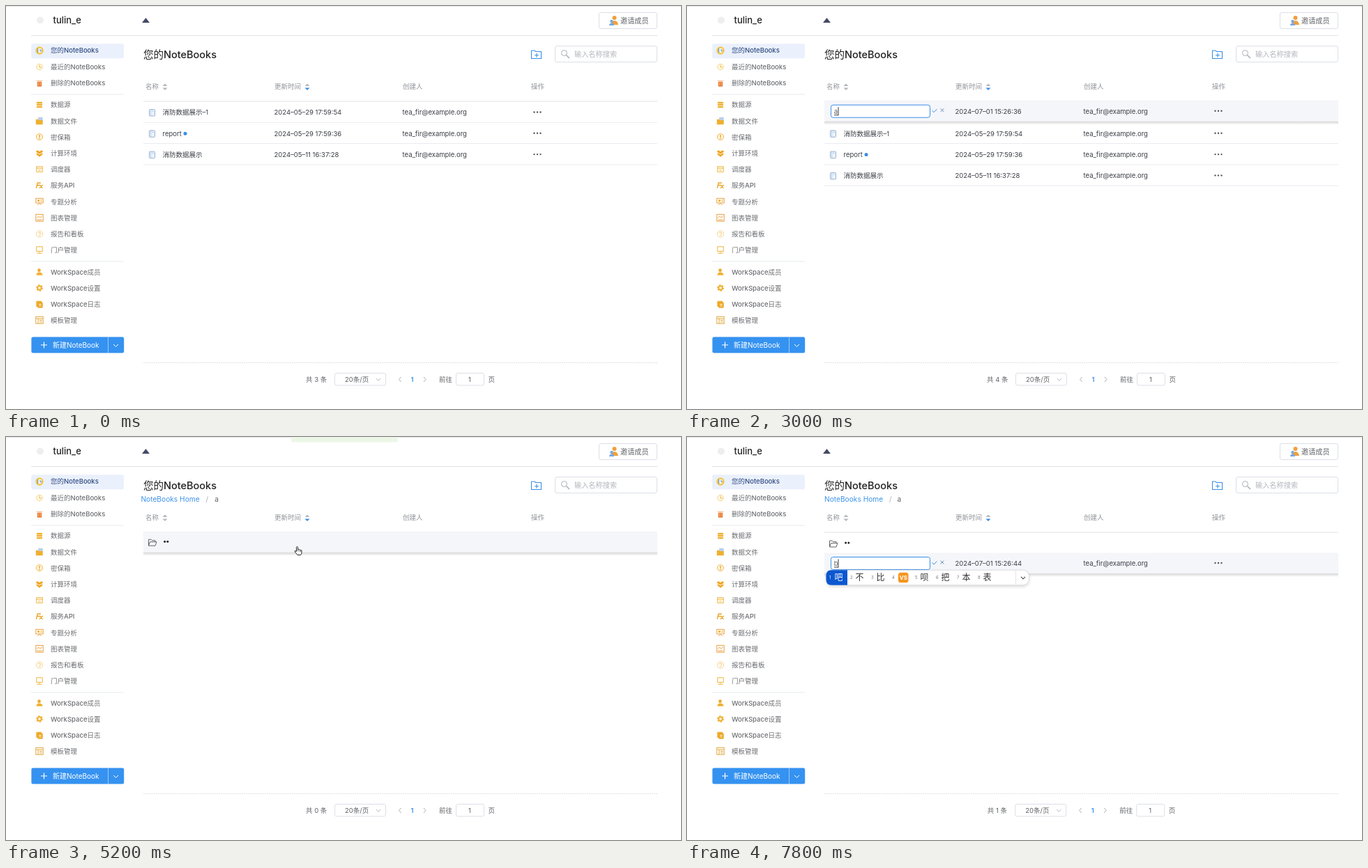
Animation of 968 by 579 pixels, one loop 8 s. Source, as an HTML page:

```html
<!DOCTYPE html>
<html lang="zh-CN">
<head>
<meta charset="utf-8">
<style>
html, body { margin: 0; width: 100%; height: 100%; overflow: hidden; background: #fff; }
svg { display: block; width: 968px; height: 579px; font: 9.5px Inter, "Noto Sans CJK SC", "Noto Sans CJK", sans-serif; }
.shade { filter: drop-shadow(0 2px 2px rgba(0, 0, 0, .15)); }
</style>
</head>
<body>
<svg viewBox="0 0 968 579">
<defs><linearGradient id="fall" x2="0" y2="1"><stop stop-opacity=".16"/><stop offset="1" stop-opacity="0"/></linearGradient></defs>
<g id="base"></g><g id="live"></g>
</svg>
<script>
const LOOP = 8000, PITCH = 30.3;
const BLUE = '#3a8ee6', GREY = '#606266', DARK = '#3b3e45', PALE = '#dcdfe6', GOLD = '#efb02e', ORANGE = '#e99a35';

// y is the vertical centre of the text
const text = (x, y, str, fill = GREY, size = 9.5, more = '') =>
  `<text x="${x}" y="${y + size * .36}" fill="${fill}" font-size="${size}" ${more}>${str}</text>`;
const rect = (x, y, w, h, fill, more = '') =>
  `<rect x="${x}" y="${y}" width="${w}" height="${h}" fill="${fill}" ${more}/>`;
const path = (d, stroke, width = 1, fill = 'none', more = '') =>
  `<path d="${d}" stroke="${stroke}" stroke-width="${width}" fill="${fill}" ${more}/>`;
const dot = (x, y, r, fill, more = '') => `<circle cx="${x}" cy="${y}" r="${r}" fill="${fill}" ${more}/>`;
const at = (x, y, body, scale = 1) => `<g transform="translate(${x} ${y}) scale(${scale})">${body}</g>`;
const box = (x, y, w, h, stroke = PALE) => rect(x + .5, y + .5, w - 1, h - 1, '#fff', `rx="2.5" stroke="${stroke}"`);
const line = (y, x1, x2, color) => path(`M${x1} ${y}H${x2}`, color);

const outline = (x, y, w, h, color) => rect(x, y, w, h, 'none', `stroke="${color}"`);
const menu = [
  [64, '您的NoteBooks', dot(0, 0, 6, '#f3c53f') + rect(-2.5, -3.5, 5.5, 7, '#f5f8ff', 'rx="1"') + path('M-2.5 -3.5V3.5M0 -1H2V2', '#5a86d0')],
  [88, '最近的NoteBooks', dot(0, -.5, 4.5, '#fffaea', 'stroke="#f4cf77"') + path('M0 -3.5V0H3', GOLD)],
  [111, '删除的NoteBooks', rect(-3.5, -2.5, 7, 7.5, '#e9823c', 'rx="1"') + path('M-4.5 -3.8H4.5M-1.5 -1V3M1.5 -1V3', '#f5b07c')],
  [142, '数据源', [-3.2, 0, 3.2].map(y => rect(-4.5, y - 1.2, 9, 2.6, GOLD, 'rx="1.3"')).join('')],
  [165.5, '数据文件', rect(-2, -6, 7, 7, '#b9d0ea', 'rx="1"') + path('M-5.5 -3H-2L-1 -1.5H5V5H-5.5Z', 'none', 0, GOLD)],
  [188.5, '密保箱', dot(0, -.5, 4.7, '#fff8e4', `stroke="${GOLD}"`) + dot(0, -2, 1.2, ORANGE) + path('M0 -1V3', ORANGE)],
  [212, '计算环境', path('M-5.5 -3.5L-3 -5 0 -3 3 -5 5.5 -3.5 3.5 -1 5 1 0 5 -5 1 -3.5 -1Z', 'none', 0, '#f0a51f') + path('M-3.5 -1L0 1 3.5 -1', '#fff')],
  [235, '调度器', outline(-4.5, -4.5, 9, 8, GOLD) + path('M-4.5 -2H4.5M-2 1H2', GOLD)],
  [258, '服务API', path('M-5 4L-3 -4H2M-4 -.5H1M0 4L5 -1M1 -1L4.5 4', '#eaa21f', 1.4)],
  [281.5, '专题分析', outline(-5.5, -5.5, 11, 7, ORANGE) + path('M-3 4.5L0 2 3 4.5', ORANGE) + dot(-1.5, -2, 1.8, GOLD) + path('M1.5 -3H4M1.5 -1H4', GOLD)],
  [304.5, '图表管理', outline(-5.5, -5.5, 11, 10.5, ORANGE) + path('M-4 0L-1.5 -2.5 1 -.5 4 -3M-4 3H4', ORANGE)],
  [328, '报告和看板', dot(0, -.5, 5, '#fffaf0', 'stroke="#f5d79b"') + path('M-2 -2Q0 -4 2 -2Q2 0 0 1V2.5', '#f2cc82')],
  [351, '门户管理', outline(-4.5, -5.5, 9, 7, GOLD) + path('M0 2V4M-4 4.5H4', GOLD)],
  [382.5, 'WorkSpace成员', dot(-.5, -3, 2.5, '#edab29') + path('M-5 4.5Q-4 0 -.5 0Q4 0 5 4.5Z', 'none', 0, GOLD)],
  [405.5, 'WorkSpace设置', dot(0, -.5, 3, 'none', `stroke="${GOLD}" stroke-width="2.2"`) + dot(0, -.5, 4.5, 'none', `stroke="${GOLD}" stroke-width="1.5" stroke-dasharray="2.2 2.5"`)],
  [429, 'WorkSpace日志', rect(-5, -5.5, 8.5, 9, '#f0b12d', 'rx="1.5"') + rect(-3, -3.5, 8, 8.5, '#eda421', 'rx="1.5"') + path('M-1 -.5H3M-1 2H3', '#fff')],
  [452, '模板管理', outline(-5.5, -6, 11, 10.5, '#dfa02f') + path('M-5 -3H5M-2 -3V4M0 -.5H4M0 2H4', '#dfa02f')]
];

const sorter = (x, down) =>
  path(`M${x - 3.5} 115L${x} 111.5 ${x + 3.5} 115Z`, 'none', 0, '#b4b8c0') +
  path(`M${x - 3.5} 117.5L${x} 121 ${x + 3.5} 117.5Z`, 'none', 0, down);

const base =
  line(.5, 0, 968, '#e6e6e6') + line(42.5, 36, 934, '#e3e3e3') +
  dot(49, 20.5, 5, '#eeeeee') +
  text(67.5, 20.5, 'tulin_e', '#222', 13, 'font-weight="500"') +
  path('M195 24L200.5 17 206 24Z', 'none', 0, '#454b66') +
  box(850, 9, 84, 24) +
  dot(872.5, 17, 3, '#f0a03c') + path('M867.5 27Q868 21 872.5 21T878 27Z', 'none', 0, '#f0a03c') +
  dot(868.5, 22, 2.2, '#77a9e4') + path('M865 28Q865 24.5 868.5 24.5T872 28Z', 'none', 0, '#77a9e4') +
  text(881, 21, '邀请成员', GREY, 10.2) +
  rect(36.3, 54.3, 132.6, 21, '#eaf0fc', 'rx="2"') +
  menu.map(([y, label, icon], i) => at(48, y, icon, .94) +
    text(64, y, label, i ? '#6c6e72' : '#2f4a80', 9.5, 'font-weight="500"')).join('') +
  line(127, 36, 169, '#e8eaee') + line(367, 36, 169, '#e8eaee') +
  rect(36.4, 475.4, 132.8, 23.2, '#3592f0', 'rx="2.5"') + path('M146.5 475.4V498.6', '#9ccaf8') +
  path('M50 487H59M54.5 482.5V491.5', '#fff', 1.2) + text(67, 487, '新建NoteBook', '#fff', 10) +
  path('M154 486L157.5 489.5 161 486', '#fff') +
  text(197, 69.5, '您的NoteBooks', '#222', 14.5, 'font-weight="500"') +
  box(787, 57, 147, 24) + dot(800.5, 67.5, 4, 'none', 'stroke="#a9adb5"') + path('M803.5 70.5L808 75', '#a9adb5', 1.5) +
  text(815, 69.5, '输入名称搜索', '#b3b6bd', 10.2) +
  text(200, 116, '名称', '#8f9298') + sorter(228, '#b4b8c0') +
  text(385, 116, '更新时间', '#8f9298') + sorter(432, BLUE) +
  text(569, 116, '创建人', '#8f9298') + text(753, 116, '操作', '#8f9298') +
  line(137, 197, 934, '#dfe1e6') +
  path('M197 512.5H934', '#dfe1e6', 1, 'none', 'stroke-dasharray="2 1"');

const files = [
  { name: '消防数据展示–1', time: '2024–05–29 17:59:54' },
  { name: 'report', time: '2024–05–29 17:59:36', unread: true },
  { name: '消防数据展示', time: '2024–05–11 16:37:28' }
];
const newA = { name: 'a', time: '2024–07–01 15:26:36' };
const newB = { name: 'b', time: '2024–07–01 15:26:44' };
const up = { up: true };

const track = [
  [350, 640, 340], [700, 735, 135], [950, 759, 72], [1400, 759, 72], [1650, 640, 112],
  [2150, 340, 152], [2650, 333, 151], [3950, 333, 151], [4500, 419, 163], [5650, 419, 163],
  [5800, 740, 148], [5900, 759, 72], [6080, 759, 72], [6150, 640, 112], [6250, 365, 199],
  [6300, 365, 199], [6500, 338, 182], [7050, 333, 181]
];

const clamp = v => Math.min(1, Math.max(0, v));
const ramp = (t, start, length) => clamp((t - start) / length);
const within = (t, a, b) => t >= a && t < b;

function pointer(t) {
  const i = track.findIndex(k => k[0] > t);
  if (i < 1) return (i ? track[track.length - 1] : track[0]).slice(1);
  const [a, x, y] = track[i - 1], [b, u, v] = track[i];
  const p = (t - a) / (b - a), e = p * p * (3 - 2 * p);
  return [x + (u - x) * e, y + (v - y) * e];
}

const folder = y => at(204, y - 4.5,
  path('M.5 9.5V.5H4L5.5 2H10V4M.5 9.5L2.5 4H12L10 9.5Z', '#62656c', 1, 'none', 'stroke-linejoin="round"'));
const sheet = y => rect(205.5, y - 4.5, 8, 9.5, '#eaf3fd', 'rx="1" stroke="#93aac8" stroke-width=".9"') +
  path(`M207.5 ${y - 4.5}V${y + 5}M209 ${y - 2}H212`, '#a5c4e8', .8);

function editor(y, name, typed, composing, caret) {
  const end = typed ? 217 : 212;
  return rect(206.5, y - 9, 142, 18, '#fff', `rx="3" stroke="${BLUE}"`) +
    (typed ? text(210.8, y, name) : '') +
    (composing ? path(`M211 ${y + 5.5}H217`, '#333', .9) : '') +
    (caret ? path(`M${end} ${y - 6}V${y + 6}`, '#222', .9) : '') +
    path(`M351.5 ${y - 1}L354 ${y + 1.5} 358.5 ${y - 3}`, BLUE) +
    path(`M363.5 ${y - 4}L368.5 ${y + 1}M368.5 ${y - 4}L363.5 ${y + 1}`, '#6d8fb8');
}

function row(item, i, hovered, fill, edit) {
  const top = 137 + PITCH * i, y = top + (hovered ? 14.2 : 16);
  let s = hovered
    ? rect(197, top - .5, 737, PITCH - 1, fill) + rect(197, top + PITCH - 1.5, 737, 5, 'url(#fall)')
    : line(top + PITCH, 197, 934, '#e8ebf0');
  if (item.up) return s + folder(y) + dot(227.6, y - 1, 1.5, '#222') + dot(231.8, y - 1, 1.5, '#222');
  const isNew = item === newA || item === newB;
  if (edit) s += editor(y, item.name, ...edit);
  else s += (isNew ? folder(y) : sheet(y)) + text(224.5, y, item.name, DARK) +
    (item.unread ? dot(257, y, 2.5, BLUE) : '');
  return s + text(384.5, y, item.time, DARK) + text(568.5, y, 'tea_fir@example.org', DARK) +
    [757.5, 762, 766.5].map(x => dot(x, y - .5, 1.2, '#55585f')).join('');
}

function candidates(y, words) {
  return rect(199.5, y, 291, 21.5, '#fff', 'rx="9" class="shade" stroke="#d6d6d6" stroke-width=".7"') +
    path(`M230 ${y}V${y + 21.5}H207Q199.5 ${y + 21.5} 199.5 ${y + 13.5}V${y + 8}Q199.5 ${y} 207 ${y}Z`, 'none', 0, '#0b57d0') +
    [...words].map((w, i) => {
      const x = 204 + 30 * i + (i > 3 ? 3 : 0), color = i ? '#333' : '#fff';
      return text(x, y + 11, i + 1, i ? '#777' : '#fff', 6) + (w === '*'
        ? rect(x + 9, y + 3.5, 14.5, 14.5, '#f5951f', 'rx="3.5"') + text(x + 10.8, y + 10.8, 'VS', '#fff', 8, 'font-weight="700"')
        : text(x + 7.5, y + 10.5, w, color, 12));
    }).join('') +
    path(`M471.5 ${y + 1}V${y + 20.5}`, '#e4e4e4') +
    path(`M479 ${y + 9.5}L482 ${y + 12.5} 485 ${y + 9.5}`, '#555', 1.2);
}

function pager(n) {
  const d = n === 1 ? -.8 : 0;
  return text(430 - d, 536.5, `共 ${n} 条`) + at(d, 0,
    box(471, 527, 74, 18.5) + text(486, 536.5, '20条/页') + path('M531 535L534 538.5 537 535', '#b8bcc4') +
    path('M566.5 533L563.5 536.5 566.5 540M599 533L602 536.5 599 540', '#a9adb5') +
    text(580.5, 536.5, '1', BLUE, 9.5, 'font-weight="600"') + text(621, 536.5, '前往') +
    box(645, 527, 41, 18.5) + text(663, 536.5, '1') + text(691.5, 536.5, '页'));
}

const hand = path('M3 7.5V1.5Q3 .5 4 .5T5 1.5V4.5Q6.5 3.7 7 5 8.3 4.3 8.8 5.5 10.5 5 10.5 6.5V9Q10.5 11 9 12.5H4.5Q3.5 11 .8 8 .3 6.5 1.5 6.5Z',
  '#222', 1, '#fff', 'stroke-linejoin="round"') + path('M5 4.5V7M7 5.5V7.5M9 6V8', '#222', .7);
const arrow = path('M1 0V11L3.5 8.7 5.2 12.5 7 11.7 5.3 8H8.7Z', '#fff', .8, '#111');
const beam = path('M-2.5 -7.5Q0 -7.5 0 -6V6Q0 7.5 -2.5 7.5M2.5 -7.5Q0 -7.5 0 -6M0 6Q0 7.5 2.5 7.5', '#333');

function scene(t) {
  const inside = t >= 4900;
  const items = t < 1800 ? files : !inside ? [newA, ...files] : t < 6350 ? [up] : [up, newB];
  const editing = within(t, 1800, 3500) ? 0 : t >= 6350 ? 1 : -1;
  const edit = editing ? [t >= 7700, t >= 7700, t >= 7350] : [t >= 3000, within(t, 3000, 3300), t >= 2850];
  const [x, y] = pointer(t);
  const index = Math.floor((y - 136) / PITCH);
  const hover = x > 197 && index >= 0 && index < items.length ? index : -1;
  const onIcon = Math.abs(x - 760) < 12 && Math.abs(y - 70) < 12;
  const picked = within(t, 4550, 4900);

  let s = `<g opacity="${onIcon ? .45 : 1}">` +
    at(753, 63, path('M.5 1H5L6.5 2.5H14.5V12.5H.5ZM5 7.7H11M8 4.8V10.7', BLUE, 1.1)) + '</g>';

  if (inside) {
    const d = -15 * (1 - ramp(t, 4950, 330));
    s += `<g opacity="${ramp(t, 4930, 200)}">` + text(197 + d, 89.5, 'NoteBooks Home', '#3d93ea', 10.2) +
      text(290 + d, 89.5, '/', '#a9adb5', 10.2) + text(301.5 + d * .6, 89.5, 'a', GREY, 10.2) + '</g>';
  }

  const rows = items.map((item, i) => row(item, i, i === hover, picked ? '#fdf2df' : '#f5f6fa', i === editing && edit));
  if (hover >= 0) rows.push(rows.splice(hover, 1)[0]);
  s += rows.join('') + pager(items.length - (inside ? 1 : 0));

  const tip = Math.min(ramp(t, 900, 150), 1 - ramp(t, 1450, 200)) + Math.min(ramp(t, 5880, 120), 1 - ramp(t, 6230, 200));
  if (tip > 0) s += `<g opacity="${clamp(tip)}">` + rect(709, 25, 62, 23.5, '#303133', 'rx="3"') +
    path('M755.5 48L760 52.5 764.5 48Z', 'none', 0, '#303133') + text(717.5, 36.7, '新建文件夹', '#fff', 9) + '</g>';

  const slide = Math.min(ramp(t, 3450, 300), 1 - ramp(t, 5300, 300));
  if (slide > 0) s += rect(409, -30, 153, 30 + 7.5 * slide, '#edf7e7', `rx="2.5" opacity="${slide}"`);

  if (within(t, 3050, 3300)) s += candidates(162, '啊阿爱安按案奥暗');
  if (t >= 7750) s += candidates(191.3, '吧不比*呗把本表');

  if (within(t, 350, 2850) || within(t, 3950, 7350)) {
    const overInput = editing >= 0 && hover === editing && x < 348;
    s += overInput ? at(x, y, beam) : at(x - 5.5, y - 6, t < 900 && hover < 0 ? arrow : hand);
  }
  return s;
}

document.getElementById('base').innerHTML = base;
const live = document.getElementById('live');
const begin = performance.now();
let shown = '';
function draw() {
  const next = scene((performance.now() - begin) % LOOP);
  if (next !== shown) live.innerHTML = shown = next;
  requestAnimationFrame(draw);
}
draw();
</script>
</body>
</html>
```
